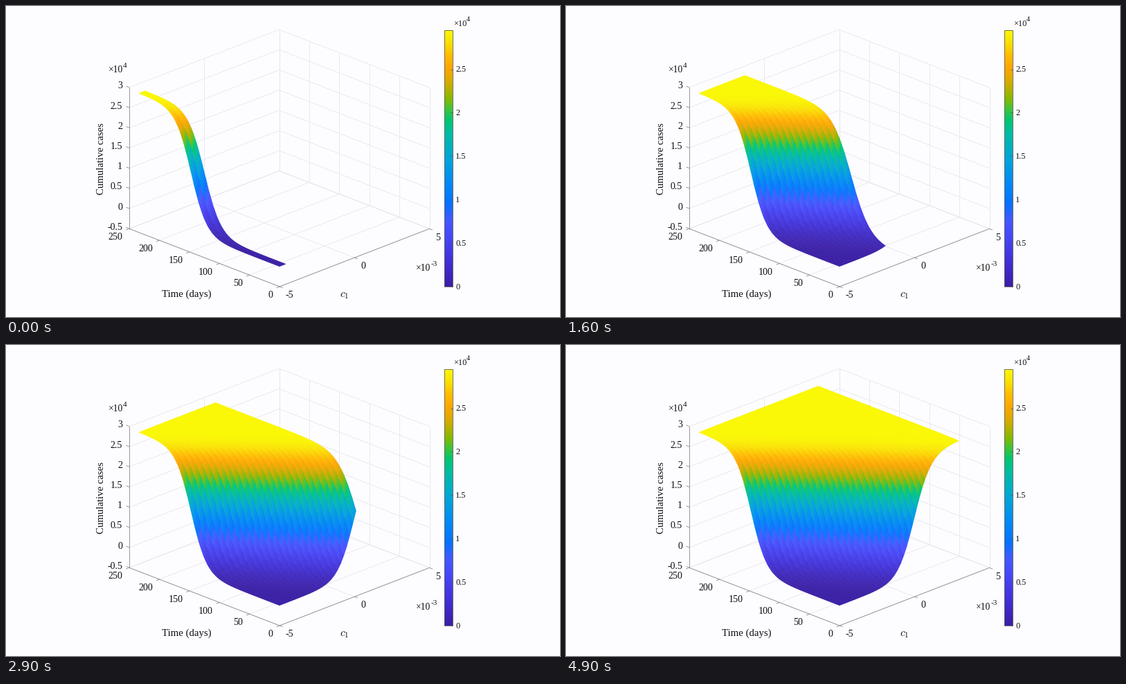
A matplotlib script that plays this animation: 800 by 450 pixels, repeating every 5 s.

```python
import numpy as np
import matplotlib.pyplot as plt
from matplotlib.animation import FuncAnimation
from matplotlib.collections import LineCollection, PolyCollection
from matplotlib.colors import LinearSegmentedColormap
from matplotlib.patches import Rectangle

W, H, DPI = 800, 450, 100
FRAMES, INTERVAL = 50, 100
PT = 72 / DPI
PEAK = 2.95          # plateau of the cases, in units of 10^4
LAST_DAY = 234
STEP = 10 / 49       # width of one strip along c1
MAX_STRIPS = 39
PAPER, INK, AXIS, GRID = "#fdfcff", "#101010", "#858585", "#e6e5e9"

plt.rcParams["font.family"] = "Liberation Serif"
plt.rcParams["mathtext.fontset"] = "cm"

CMAP = LinearSegmentedColormap.from_list("cases", [
    (0.00, "#3a1ea6"), (0.10, "#4231d8"), (0.20, "#4748fa"),
    (0.26, "#425aff"), (0.32, "#0671ff"), (0.40, "#0088f6"),
    (0.50, "#00a5d8"), (0.60, "#00bca2"), (0.65, "#00c672"),
    (0.69, "#3ac43e"), (0.73, "#80ba06"), (0.77, "#b4b000"),
    (0.81, "#dfaa00"), (0.86, "#ffa700"), (0.91, "#ffc000"),
    (0.95, "#fadd00"), (1.00, "#faf800")], N=256)


def project(day, c, z):
    """Orthographic view; c runs from 0 to 10 along the right-hand axis."""
    x = 395 + 21.65 * c - 0.868 * day
    y = 406 - 8.37 * c - 0.335 * day - 58.4 * (z + 0.5)
    return x, y


def cases(day, c):
    """Logistic growth; the turning point comes earlier as c rises."""
    rate = 0.061 + 0.016 * np.exp(-c / 2)
    turning_day = 147 - 29.4 * c
    return PEAK / (1 + np.exp(-rate * (day - turning_day)))


def label(x, y, text, size=14, ha="left", **kw):
    """Text whose digits are centred on height y."""
    return ax.text(x, y + 0.33 * size, text, fontsize=size * PT, ha=ha,
                   va="baseline", color=INK, **kw)


def power(x, y, exponent, size=13.6):
    label(x, y, "×10", size)
    label(x + 1.57 * size, y - 0.48 * size, exponent, size * 0.82)


def lines(segments, color, width=0.8, zorder=1):
    ax.add_collection(LineCollection(segments, colors=color,
                                     linewidths=width * PT, zorder=zorder))


def draw_box():
    levels, days = np.arange(-0.5, 3.1, 0.5), np.arange(0, 251, 50)
    grid = []
    for z in levels:
        grid += [[project(250, 0, z), project(250, 10, z)],
                 [project(250, 10, z), project(0, 10, z)]]
    for d in days:
        grid += [[project(d, 10, -0.5), project(d, 10, 3)],
                 [project(d, 0, -0.5), project(d, 10, -0.5)]]
    for c in (0, 5, 10):
        grid += [[project(250, c, -0.5), project(250, c, 3)],
                 [project(0, c, -0.5), project(250, c, -0.5)]]
    lines(grid, GRID)

    front, left = project(0, 0, -0.5), project(250, 0, -0.5)
    axes = [[project(250, 0, 3), left], [left, front],
            [front, project(0, 10, -0.5)]]

    def tick(point, dx, dy):
        axes.append([point, (point[0] + dx, point[1] + dy)])
        return point

    for z in levels:
        x, y = tick(project(250, 0, z), -4.5, -1.8)
        label(x - 9.8, y - 3, f"{z:g}", ha="right")
    for d in days:
        x, y = tick(project(d, 0, -0.5), -4.5, 1.8)
        label(x - 9.5, y + 11.6, str(d), ha="right")
    for c in (0, 5, 10):
        x, y = tick(project(0, c, -0.5), 4.5, 1.8)
        label(x + 9, y + 11.6, str(c - 5))
    lines(axes, AXIS, zorder=2)

    power(147.5, 91.7, "4")
    power(592, 379, "-3")
    label(225, 416.2, "Time (days)", 14.9)
    label(482.5, 416.2, "$c_1$", 15.5)
    ax.text(144, 221.3, "Cumulative cases", fontsize=14.8 * PT, rotation=90,
            ha="right", va="center", rotation_mode="default", color=INK)


def draw_colorbar():
    left, right, top, bottom = 633, 645, 35, 406
    ax.imshow(np.linspace(1, 0, 256)[:, None], cmap=CMAP, aspect="auto",
              extent=(left, right, bottom, top), zorder=3)
    ax.add_patch(Rectangle((left, top), right - left, bottom - top,
                           fill=False, ec="#55554f", lw=0.8 * PT, zorder=4))
    scale = (bottom - top) / PEAK
    for value in np.arange(0, 2.6, 0.5):
        y = bottom - value * scale
        lines([[(right - 3.5, y), (right, y)]], "#55554f", zorder=4)
        label(649, y - 0.3, f"{value:g}", 12.2)
    power(646, 25, "4", 12.2)


def surface_cells():
    """Flat-coloured cells, ordered strip by strip along c1."""
    c, day = np.meshgrid(np.arange(MAX_STRIPS + 1) * STEP,
                         np.arange(LAST_DAY + 1), indexing="ij")
    z = cases(day, c)
    p = np.stack(project(day, c, z), axis=-1)
    quads = np.stack([p[:-1, :-1], p[1:, :-1], p[1:, 1:], p[:-1, 1:]], axis=2)
    return quads.reshape(-1, 4, 2), CMAP(z[:-1, :-1].ravel() / PEAK)


fig = plt.figure(figsize=(W / DPI, H / DPI), dpi=DPI, facecolor=PAPER)
ax = fig.add_axes([0, 0, 1, 1])
draw_box()
draw_colorbar()
ax.set(xlim=(0, W), ylim=(H, 0))
ax.axis("off")

quads, colors = surface_cells()
surface = PolyCollection([], linewidths=0.3, zorder=3)
ax.add_collection(surface, autolim=False)


def update(i):
    strips = int(round(np.interp(i, [0, 10, FRAMES - 1], [2, 11, MAX_STRIPS])))
    count = strips * LAST_DAY
    surface.set_verts(quads[:count])
    surface.set_facecolor(colors[:count])
    surface.set_edgecolor(colors[:count])
    return [surface]


anim = FuncAnimation(fig, update, frames=FRAMES, interval=INTERVAL,
                     repeat=True, repeat_delay=0, blit=False)
plt.show()
```
